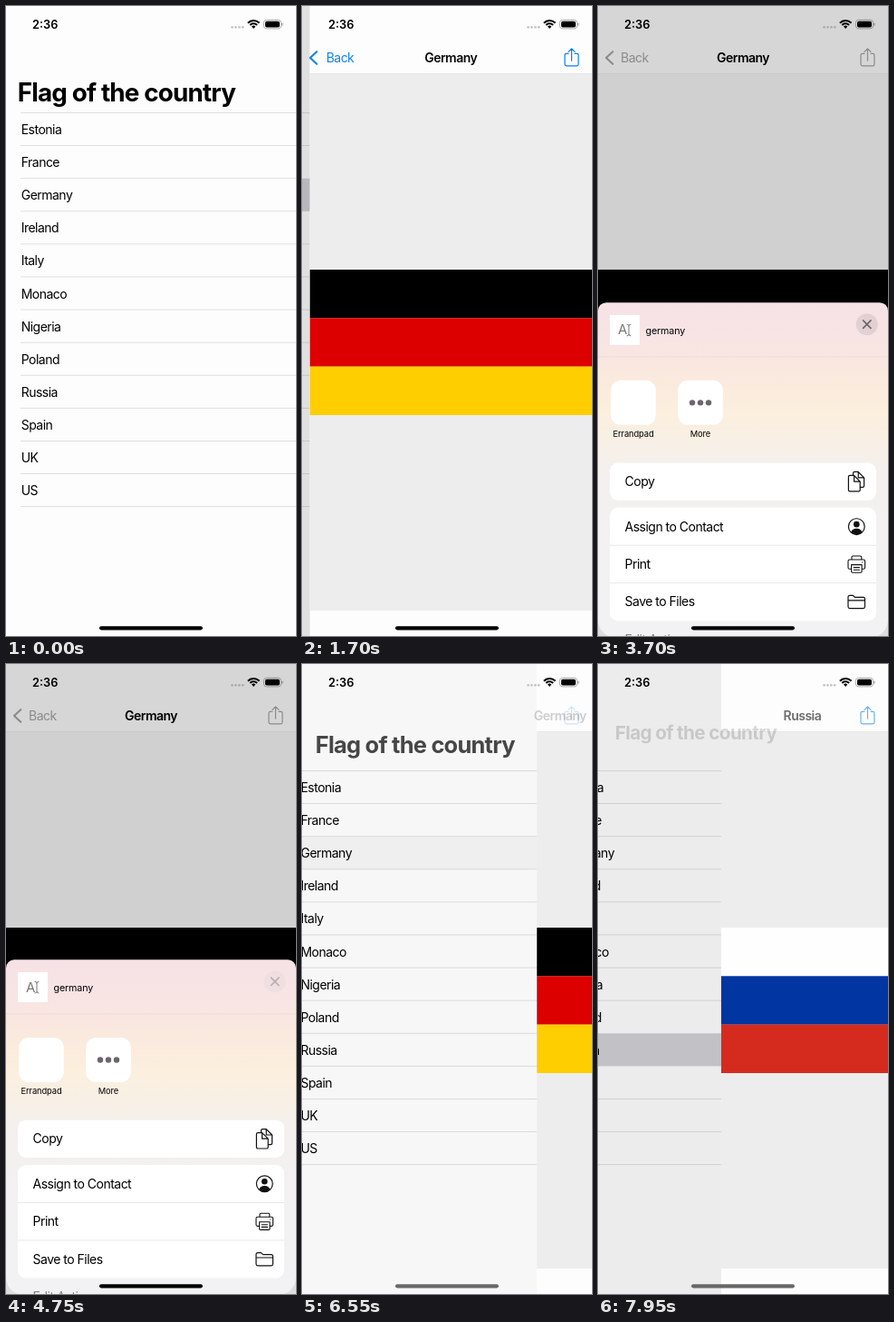
An HTML page with a canvas for the animation above (8 s loop, 320x693 px).

```html
<!DOCTYPE html>
<html lang="en">
<head>
<meta charset="utf-8">
<title>Flag of the country</title>
<style>
html, body { margin: 0; width: 100%; height: 100%; overflow: hidden; background: #fdfdfd; }
canvas { display: block; width: 100%; height: 100%; }
</style>
</head>
<body>
<canvas></canvas>
<script>
const W = 320, H = 693, LOOP = 8000, STEP = 50;
const BG = '#fdfdfd', BLUE = [0, 122, 235], GREY = [158, 158, 158];
const ROW_TOP = 117.5, ROW = 36.1;
const COUNTRIES = ['Estonia', 'France', 'Germany', 'Ireland', 'Italy', 'Monaco',
  'Nigeria', 'Poland', 'Russia', 'Spain', 'UK', 'US'];
const FLAGS = {
  Germany: ['#000', '#dd0000', '#ffce00'],
  Russia: ['#fefefe', '#0035a2', '#d52b1e']
};

const canvas = document.querySelector('canvas');
const ctx = canvas.getContext('2d');

const clamp = v => Math.max(0, Math.min(1, v));
const lerp = (a, b, k) => a + (b - a) * k;
const mix = (a, b, k) => `rgb(${a.map((v, i) => Math.round(lerp(v, b[i], k))).join()})`;

// Critically damped spring from 0 to 1
function spring(t, start, rate) {
  const x = Math.max(0, t - start) / 1000 * rate;
  return 1 - (1 + x) * Math.exp(-x);
}

function fade(alpha, draw) {
  if (alpha <= 0.003) return;
  ctx.save();
  ctx.globalAlpha *= clamp(alpha);
  draw();
  ctx.restore();
}

function rect(x, y, w, h, fill) {
  ctx.fillStyle = fill;
  ctx.fillRect(x, y, w, h);
}

function round(x, y, w, h, r, fill) {
  ctx.beginPath();
  ctx.roundRect(x, y, w, h, r);
  ctx.fillStyle = fill;
  ctx.fill();
}

function dot(x, y, r, fill) {
  ctx.beginPath();
  ctx.arc(x, y, r, 0, Math.PI * 2);
  ctx.fillStyle = fill;
  ctx.fill();
}

function line(d, color, width) {
  ctx.strokeStyle = color;
  ctx.lineWidth = width;
  ctx.lineCap = ctx.lineJoin = 'round';
  ctx.stroke(new Path2D(d));
}

function text(str, x, y, { size = 14, weight = 400, color = '#000', align = 'left', track = -0.037 } = {}) {
  ctx.font = `${weight} ${size}px Inter, "Liberation Sans", sans-serif`;
  ctx.letterSpacing = `${size * track}px`;
  ctx.textAlign = align;
  ctx.fillStyle = color;
  ctx.fillText(str, x, y);
}

function drawStatus() {
  text('2:36', 29, 24.8, { size: 12.8, weight: 600, track: 0 });
  for (let i = 0; i < 4; i++) dot(249.6 + i * 3.9, 23.3, 1.4, '#c6c6c8');
  ctx.lineCap = 'butt';
  ctx.strokeStyle = '#000';
  ctx.lineWidth = 2;
  for (const r of [8.6, 5.3]) {
    ctx.beginPath();
    ctx.arc(273.2, 24.6, r, -Math.PI * 0.76, -Math.PI * 0.24);
    ctx.stroke();
  }
  ctx.beginPath();
  ctx.moveTo(273.2, 25);
  ctx.arc(273.2, 24.6, 3, -Math.PI * 0.76, -Math.PI * 0.24);
  ctx.fillStyle = '#000';
  ctx.fill();
  ctx.beginPath();
  ctx.roundRect(284.5, 15.3, 19, 9.6, 3);
  ctx.strokeStyle = '#a3a3a3';
  ctx.lineWidth = 0.9;
  ctx.stroke();
  round(286, 16.8, 16, 6.6, 1.7, '#000');
  round(304.4, 18.6, 1.2, 3.2, 0.8, '#a3a3a3');
}

function drawList(selected, glow) {
  if (selected >= 0) {
    fade(glow, () => rect(0, ROW_TOP + selected * ROW, W, ROW, '#d0cfd4'));
  }
  COUNTRIES.forEach((name, i) => text(name, 16.7, 141 + i * ROW));
  for (let i = 0; i <= COUNTRIES.length; i++) {
    if (glow > 0.5 && (i === selected || i === selected + 1)) continue;
    rect(16, ROW_TOP - 0.5 + i * ROW, W - 16, 0.9, '#dcdcde');
  }
}

function drawDetail(name, sheet) {
  rect(0, 0, W, H, BG);
  rect(0, 0, W, 75, mix([253, 253, 253], [243, 243, 243], sheet));
  rect(0, 74.5, W, 590.5, '#ededed');
  rect(0, 74.2, W, 0.6, '#dedede');
  FLAGS[name].forEach((c, i) => rect(0, 290 + i * 53.3, W, 53.4, c));
}

function drawBar(name, p, s) {
  const tint = mix(BLUE, GREY, s.sheet);
  fade((p - 0.6) / 0.4 * s.back, () => {
    line('M16.3 50.2L9 57L16.3 63.8', tint, 2.1);
    text('Back', 25 + (1 - p) * 60, 62, { color: tint });
  });
  fade(p, () => text(name, 160 + 154 * (1 - p), 62, { weight: 600, align: 'center' }));
  fade(p * s.share, () => {
    line('M294 52.3H291.8Q290 52.3 290 54.1V64Q290 65.8 291.8 65.8H303.2Q305 65.8 305 64V54.1Q305 52.3 303.2 52.3H301' +
      'M297.5 60.2V47.2M294 50.3L297.5 46.8L301 50.3', tint, 1.2);
  });
}

// The large title shrinks towards the back button
function drawTitle(p) {
  fade(1 - 1.48 * p, () => {
    ctx.translate(lerp(12.8, 23, p), lerp(104.7, 67, p));
    ctx.scale(1 - 0.447 * p, 1 - 0.447 * p);
    text('Flag of the country', 0, 0, { size: 27.8, weight: 700, track: -0.03 });
  });
}

function sheetFill() {
  const g = ctx.createLinearGradient(0, 325, 0, 693);
  [[0, '#f6e2e6'], [0.16, '#f9e5e1'], [0.22, '#fae9de'], [0.33, '#fcefdd'],
    [0.42, '#f8f0e6'], [0.52, '#f3f0ef'], [1, '#f2f2f4']].forEach(([k, c]) => g.addColorStop(k, c));
  return g;
}

function drawActions() {
  round(13, 501.7, 294, 41.3, 9, '#fff');
  round(13, 551, 294, 124.6, 9, '#fff');
  rect(13, 592, 294, 0.7, '#dedee0');
  rect(13, 633.6, 294, 0.7, '#dedee0');
  ['Copy', 'Assign to Contact', 'Print', 'Save to Files']
    .forEach((label, i) => text(label, 29.6, [527.4, 577, 618.2, 659.6][i]));
  text('Edit Actions…', 29.6, 701, { color: '#808488' });

  // Copy
  line('M281.5 515.5V513.3Q281.5 511.6 283.2 511.6H287.2L293.6 518V527Q293.6 528.6 292 528.6H289.4' +
    'M287.2 511.8V518H293.4' +
    'M278 515.6H282.6L289.2 522.2V531.4Q289.2 533 287.6 533H278Q276.4 533 276.4 531.4V517.2Q276.4 515.6 278 515.6' +
    'M282.6 515.8V522.2H289', '#111', 1.2);

  // Contact
  ctx.beginPath();
  ctx.arc(285.3, 571.8, 8.9, 0, Math.PI * 2);
  ctx.save();
  ctx.clip();
  dot(285.3, 569.3, 3.3, '#111');
  ctx.beginPath();
  ctx.ellipse(285.3, 578.7, 6.2, 4.7, 0, 0, Math.PI * 2);
  ctx.fill();
  ctx.restore();
  line('M294.2 571.8A8.9 8.9 0 1 1 276.4 571.8A8.9 8.9 0 1 1 294.2 571.8', '#111', 1.2);

  // Printer
  line('M280 608.2V605.5Q280 604.2 281.3 604.2H289.5Q290.8 604.2 290.8 605.5V608.2' +
    'M279.5 618.4H277.6Q276 618.4 276 616.8V609.8Q276 608.2 277.6 608.2H293Q294.6 608.2 294.6 609.8V616.8Q294.6 618.4 293 618.4H291.2' +
    'M279.6 613.8H291.1V621.2Q291.1 622.4 289.9 622.4H280.8Q279.6 622.4 279.6 621.2Z' +
    'M282.2 616.8H288.5M282.2 619.4H288.5M291.6 611H291.7', '#111', 1.1);

  // Folder
  line('M276 651.4V649.5Q276 647.6 277.9 647.6H281.4L283.6 649.6H292.6Q294.5 649.6 294.5 651.5V660Q294.5 661.8 292.7 661.8H277.8Q276 661.8 276 660Z' +
    'M276 653H294.5', '#111', 1.2);
}

function drawSheet(p, pressed) {
  if (p < 0.002) return;
  const shift = (1 - p) * 370;
  ctx.save();
  ctx.beginPath();
  ctx.roundRect(0, 325.3 + shift, W, 369, [9, 9, 20, 20]);
  ctx.clip();
  rect(0, 320, W, H - 320, sheetFill());
  ctx.translate(0, shift);

  rect(0, 384.5, W, 0.8, '#ecdad6');
  rect(13, 339, 33, 33, '#fff');
  text('A', 22, 360.5, { size: 15, color: '#777' });
  line('M32 349.3Q34 349.3 34 351V360.4Q34 362 32 362M36 349.3Q34 349.3 34 351M34 360.4Q34 362 36 362', '#777', 1);
  text('germany', 52.6, 359.8, { size: 10.7, track: -0.015 });

  dot(296.8, 349.3, 12, pressed ? '#efdfe1' : '#e2d0d3');
  line('M292.6 345.1L301 353.5M301 345.1L292.6 353.5', pressed ? '#b8adb0' : '#6f686b', 1.7);

  round(14.2, 411, 49.6, 49, 11, '#fff');
  round(88.2, 411, 49.6, 49, 11, '#fff');
  for (let i = -1; i < 2; i++) dot(113 + i * 9, 435.5, 3.2, '#69676a');
  const label = { size: 9.3, align: 'center', track: -0.01 };
  text('Errandpad', 39, 473.2, label);
  text('More', 113, 473.2, label);

  drawActions();
  ctx.restore();
}

function stateAt(t) {
  const second = t >= 7000;
  const push = second ? spring(t, 7868, 23.56)
    : spring(t, 1468, 23.56) - spring(t, 6420, 23.56);
  const picked = second ? t >= 7750 : t >= 1350;
  return {
    name: second ? 'Russia' : 'Germany',
    push: clamp(push),
    glow: picked ? (t >= 6420 && !second ? push : 1) : 0,
    sheet: clamp(spring(t, 3285, 20) - spring(t, 5025, 20)),
    share: t >= 2750 && t < 3300 ? 0.2 : 1,
    back: t >= 6050 && t < 6450 ? 0.25 : 1,
    closing: t >= 4750 && t < 5600,
    home: clamp((t - 5050) / 500)
  };
}

function draw(t) {
  const s = stateAt(t);
  const p = s.push;
  rect(0, 0, W, H, BG);

  if (p < 0.999) {
    ctx.save();
    ctx.translate(-96 * p, 0);
    drawList(COUNTRIES.indexOf(s.name), s.glow);
    ctx.restore();
    rect(0, 0, W, H, `rgba(0,0,0,${0.115 * p})`);
  }
  if (p > 0.001) {
    ctx.save();
    ctx.translate(W * (1 - p), 0);
    drawDetail(s.name, s.sheet);
    ctx.restore();
    drawBar(s.name, p, s);
  }
  drawTitle(p);
  drawStatus();

  rect(0, 0, W, H, `rgba(0,0,0,${0.12 * s.sheet})`);
  drawSheet(s.sheet, s.closing);
  round(103, 682.2, 114, 4.3, 2.15, mix([0, 0, 0], [104, 104, 104], s.home));
}

function resize() {
  const k = window.devicePixelRatio || 1;
  canvas.width = Math.round(innerWidth * k);
  canvas.height = Math.round(innerHeight * k);
}

const begin = performance.now();
function tick() {
  const t = (performance.now() - begin) % LOOP;
  ctx.setTransform(canvas.width / W, 0, 0, canvas.height / H, 0, 0);
  draw(Math.floor(t / STEP) * STEP);
  requestAnimationFrame(tick);
}

addEventListener('resize', resize);
resize();
tick();
</script>
</body>
</html>
```
